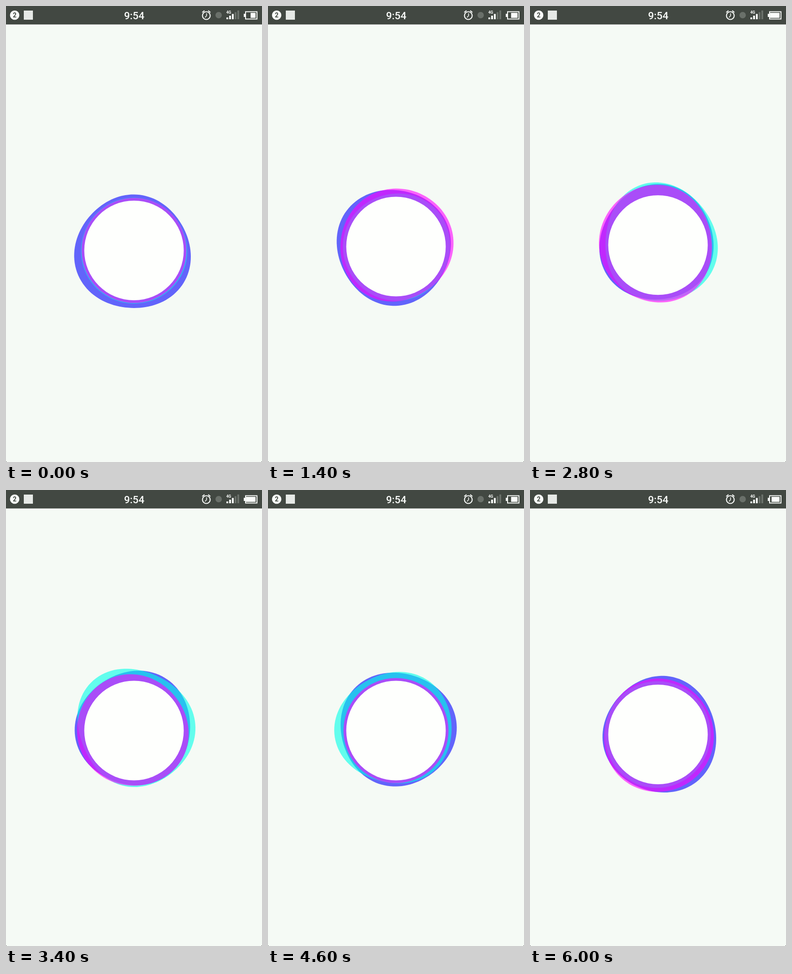
Recreate the animation shown at these times as an HTML page with a canvas. Size 561 px wide and 998 px high, loop 6.1 s.

```html
<!DOCTYPE html>
<html lang="en">
<head>
<meta charset="utf-8">
<style>
  html, body { margin: 0; width: 100%; height: 100%; overflow: hidden; background: #000; }
  canvas { display: block; border-radius: 0 0 2px 2px; }
</style>
</head>
<body>
<canvas id="stage" width="561" height="998"></canvas>
<script>
const ctx = document.getElementById('stage').getContext('2d');
const LOOP = 6100, STEP = 100;
const CX = 280.5, RADIUS = 109, REST = 115;
const INK = '#fafcfa', BAR = '#424842', DIM = '#6a706a';
const TAU = 2 * Math.PI, RAD = Math.PI / 180;

// Each blob turns at a steady speed (degrees per second) while it swells and shrinks.
// waves[k] is the amplitude and phase of the k-fold bulge; k = 0 is the mean swelling.
const blobs = [
  { color: 'rgba(0,0,255,.6)', speed: 42, peak: 0, period: Infinity,
    waves: [[10.7, 0], [5.3, 120], [1.5, 10], [3, 105]] },
  { color: 'rgba(0,255,232,.6)', speed: -45, peak: 3.6, period: 6.1,
    waves: [[13.5, 0], [8.5, 84], [4.5, 43], [4.5, 65]] },
  { color: 'rgba(255,0,255,.6)', speed: -48, peak: 2.3, period: 4.8,
    waves: [[12.5, 0], [5.2, 346], [3.5, 50], [2, 200]] },
];

function rect(x, y, w, h, color) {
  ctx.fillStyle = color;
  ctx.fillRect(x, y, w, h);
}

function disc(x, y, r, color) {
  ctx.fillStyle = color;
  ctx.beginPath();
  ctx.arc(x, y, r, 0, TAU);
  ctx.fill();
}

function text(label, x, y, font, color) {
  ctx.font = font + ' Roboto, sans-serif';
  ctx.fillStyle = color;
  ctx.fillText(label, x, y);
}

function strokePath(path, width) {
  ctx.strokeStyle = INK;
  ctx.lineWidth = width;
  ctx.stroke(new Path2D(path));
}

function drawBlob({ color, speed, peak, period, waves }, y, seconds) {
  const swell = (1 + Math.cos(TAU * (seconds - peak) / period)) / 2;
  ctx.beginPath();
  for (let deg = 0; deg < 360; deg += 3) {
    const bulge = waves.reduce((sum, [amp, phase], k) =>
      sum + amp * Math.cos((k * (deg - speed * seconds) - phase) * RAD), 0);
    const r = REST + swell * bulge;
    ctx.lineTo(CX + r * Math.cos(deg * RAD), y + r * Math.sin(deg * RAD));
  }
  ctx.fillStyle = color;
  ctx.fill();
}

function drawBall(seconds) {
  const y = 528.5 + 6.5 * Math.cos(Math.PI * seconds);
  blobs.forEach(blob => drawBlob(blob, y, seconds));
  disc(CX, y, RADIUS, '#fefffd');
}

function drawStatusBar(seconds) {
  rect(0, 0, 561, 40.4, BAR);
  ctx.textAlign = 'center';
  disc(19, 20, 10.3, INK);
  text('2', 19, 25, 'bold 14px', BAR);
  rect(39, 10, 20, 20, '#e6e9e6');
  text('9:54', 281, 28.5, '500 22.5px', INK);

  // Alarm clock
  strokePath('M447.5 21a8.5 8.5 0 1 1-17 0a8.5 8.5 0 1 1 17 0M430 14l5-4M448 14l-5-4', 2.2);
  strokePath('M439.5 16v5.5l-3.5 3.5', 1.6);
  disc(466, 20, 7, DIM);

  text('4G', 488, 16.5, 'bold 8.5px', INK);
  for (let i = 0; i < 5; i++) {
    const h = 4 + 3.8 * i;
    rect(483 + 6 * i, 29 - h, 4, h, i < 3 ? INK : DIM);
  }

  // Charging battery gains one level per second
  const left = 536 - 3.3 * (Math.floor(seconds + 0.5) % 4);
  strokePath('M525 12.5h25v16h-25z', 2);
  rect(521, 17, 4, 7, INK);
  rect(left, 15, 547 - left, 11, INK);
}

function frame() {
  const now = performance.now() % LOOP;
  const seconds = now < 2 * STEP ? 0 : Math.floor(now / STEP) * STEP / 1000;
  rect(0, 0, 561, 998, '#f5faf5');
  drawBall(seconds);
  drawStatusBar(seconds);
  requestAnimationFrame(frame);
}
frame();
</script>
</body>
</html>
```
